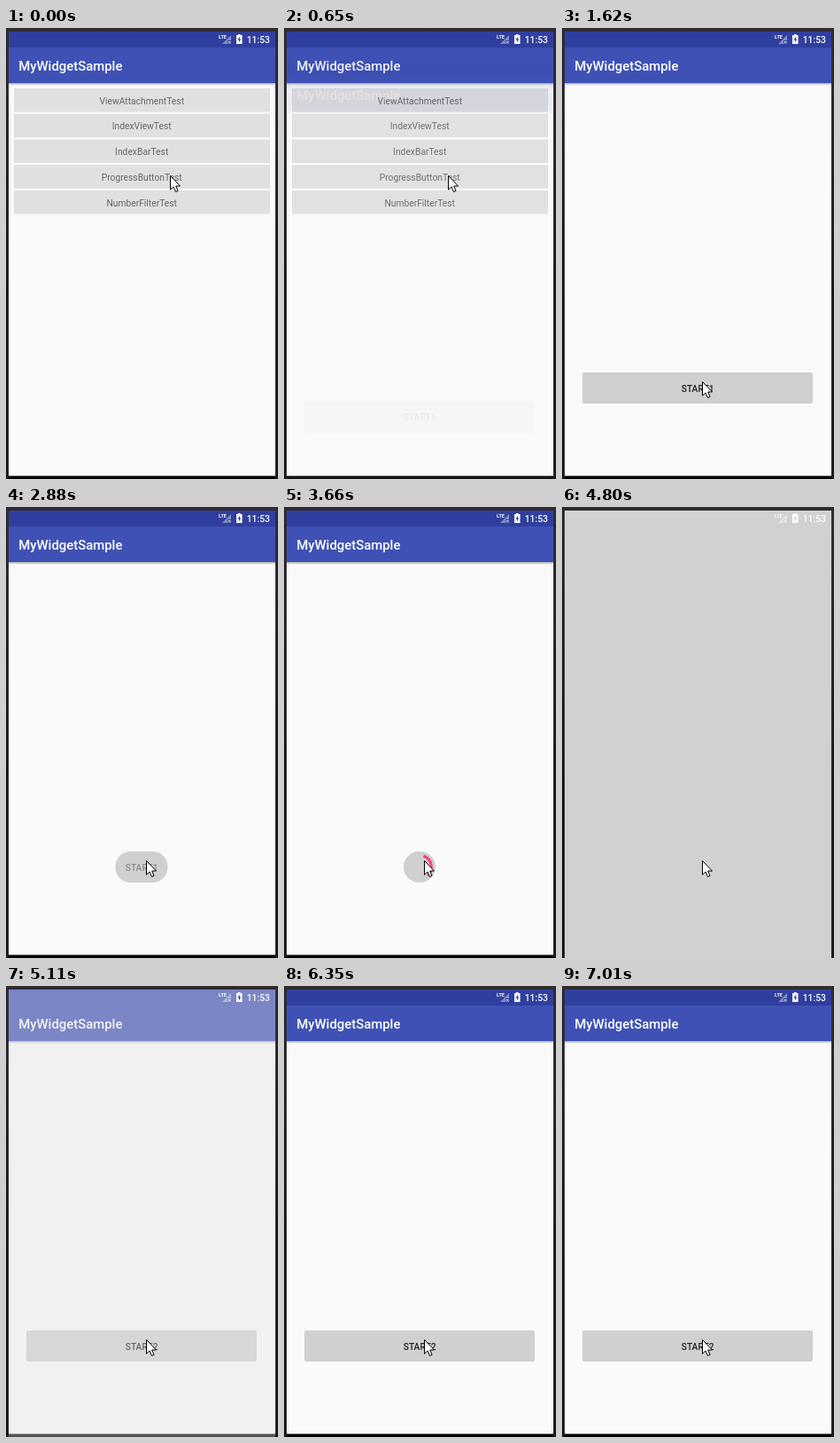
These frames come from a looping animation (307 by 508 pixels, 8 s). An HTML page:

```html
<!DOCTYPE html>
<html lang="en">
<head>
<meta charset="utf-8">
<title>Progress button</title>
<style>
  html, body { margin: 0; width: 100%; height: 100%; overflow: hidden; background: #262426; }
  svg { display: block; width: 100%; height: 100%; }
  text { font: 500 10.25px Roboto, sans-serif; }
  .title { font-size: 14.9px; fill: #fff; }
  .tiny { font-size: 5.5px; font-weight: 700; }
  #items text { font-size: 10.3px; font-weight: 400; fill: #666; text-anchor: middle; }
  #label { fill: #222; text-anchor: middle; }
</style>
</head>
<body>
<svg viewBox="0 0 307 508">
  <defs>
    <clipPath id="screen"><rect x="3" y="4" width="301" height="504"/></clipPath>
    <clipPath id="aboveEdge"><rect x="120" y="385" width="66" height="38"/></clipPath>
    <linearGradient id="bezel" x2="0" y2="1">
      <stop stop-color="#302c2f"/><stop offset=".6" stop-color="#1c1c1e"/>
    </linearGradient>
    <linearGradient id="drop" x2="0" y2="1">
      <stop stop-opacity=".3"/><stop offset="1" stop-opacity="0"/>
    </linearGradient>
    <radialGradient id="soft">
      <stop offset=".5" stop-opacity=".14"/><stop offset="1" stop-opacity="0"/>
    </radialGradient>
    <g id="chrome">
      <rect x="3" y="4" width="301" height="504" fill="#fafafa"/>
      <rect x="3" y="62" width="301" height="3" fill="url(#drop)"/>
      <rect x="3" y="4" width="301" height="58" fill="#3f51b5"/>
      <rect id="status" x="3" y="4" width="301" height="18" fill="#303f9f"/>
      <text class="title" x="14.2" y="47.8">MyWidgetSample</text>
      <rect x="3" y="504.5" width="301" height="4"/>
    </g>
  </defs>

  <rect width="307" height="508" fill="url(#bezel)"/>
  <g clip-path="url(#screen)">
    <use href="#chrome"/>
    <g id="items"></g>
    <g id="page">
      <use href="#chrome"/>
      <ellipse id="shade" cx="153" cy="414" rx="24" ry="14" fill="url(#soft)" clip-path="url(#aboveEdge)"/>
      <g id="button">
        <rect id="face" y="388" height="35" fill="#d0d0d0"/>
        <text id="label" x="153.2" y="409.5"></text>
        <path id="arc" fill="none" stroke="#ff4081" stroke-width="3"/>
      </g>
    </g>
    <circle id="reveal" cx="153" cy="405"/>
  </g>

  <g fill="#fff">
    <text class="tiny" x="240" y="11.6">LTE</text>
    <path d="M244 18h6v-4h4V8z" opacity=".4"/>
    <path d="M251 15l2.5 2.5m0-2.5l-2.5 2.5" stroke="#fff"/>
    <path d="M262 7h2.5v1h2v10h-6.5v-10h2z"/>
    <path id="bolt" d="M263.8 9.5l-2.3 4h1.4v3l2.3-4h-1.4z"/>
    <text x="271.8" y="16.6">11:53</text>
  </g>
  <path id="cursor" d="M.5 .5v15.7l3.6-3.3 2.4 5.6 2.6-1.1-2.4-5.4h4.8z" fill="#fff" stroke="#000"/>
</svg>
<script>
const el = Object.fromEntries([...document.querySelectorAll('[id]')].map(e => [e.id, e]));
const set = (e, attrs) => { for (const k in attrs) e.setAttribute(k, attrs[k]); };

const names = ['ViewAttachmentTest', 'IndexViewTest', 'IndexBarTest', 'ProgressButtonTest', 'NumberFilterTest'];
el.items.innerHTML = names.map((name, i) => {
  const y = 68 + 28.75 * i;
  return `<rect x="9" y="${y}" width="289" height="26.5" fill="#e0e0e0"/>
    <text x="153.2" y="${y + 17.5}">${name}</text>`;
}).join('');

const clamp = v => Math.min(1, Math.max(0, v));
const span = (t, start, length) => clamp((t - start) / length);
const mix = (a, b, f) => a + (b - a) * f;
const easeInOut = p => (1 - Math.cos(Math.PI * p)) / 2;
const easeOut = (p, power) => 1 - (1 - p) ** power;

// The screen refreshes at a steady, low rate
const FIRST = 500, TICK = 138.5;
const snap = t => FIRST + Math.floor((t - FIRST) / TICK) * TICK;

// The head runs ahead for a third of each turn, then the tail catches up
function spinner(t) {
  const turn = (t - 3070) / 750, n = Math.floor(turn), f = turn - n;
  const head = -213 + 260 * (n + easeOut(clamp(f * 3), 3));
  const tail = -288 + 260 * (n + easeOut(clamp(f * 1.5 - .5), 3));
  const point = deg => {
    const a = deg * Math.PI / 180;
    return `${153 + 13.3 * Math.cos(a)} ${405.5 + 13.3 * Math.sin(a)}`;
  };
  return `M${point(tail)}A13.3 13.3 0 ${head - tail > 180 ? 1 : 0} 1 ${point(head)}`;
}

function draw(t) {
  const move = span(t, 1080, 420);
  set(el.cursor, {
    transform: `translate(${mix(185, 158, easeOut(move, 2.5))} ${mix(166, 398, easeInOut(move))})`
  });

  // The new page slides up while fading in
  set(el.page, {
    opacity: span(t, 624, 200),
    transform: `translate(0 ${40.6 * (1 - easeOut(span(t, 624, 350), 5))})`
  });

  const second = t > 5050, covered = t > 4750 && !second, leaving = second && t < 5200;

  const shrink = second ? 0 : easeInOut(span(t, 2492, 458));
  const half = mix(130, 18, shrink);
  set(el.face, { x: 153 - half, width: 2 * half, rx: Math.min(17.5, mix(2, 19, shrink)) });
  el.label.textContent = second ? 'START2' : 'START1';
  set(el.label, { opacity: second ? 1 : 1 - span(t, 2492, 600) });
  set(el.arc, { d: t > 3070 && !second ? spinner(t) : '' });

  const swing = span(t, 6387, 415);
  set(el.button, { transform: `translate(${3 * Math.sin(3 * Math.PI * swing)} 0)` });

  const grow = easeInOut(span(t, 4405, 320));
  set(el.shade, { opacity: grow > 0 && !second ? 1 : 0 });
  set(el.reveal, {
    r: 434 * grow,
    fill: second ? '#e2e2e2' : '#d1d1d1',
    opacity: leaving ? .37 : second ? 0 : grow
  });
  set(el.status, { opacity: leaving ? 0 : 1 });
  set(el.bolt, { fill: covered ? '#d1d1d1' : '#303f9f' });
}

function loop() {
  draw(snap(performance.now() % 8000));
  requestAnimationFrame(loop);
}
loop();
</script>
</body>
</html>
```
